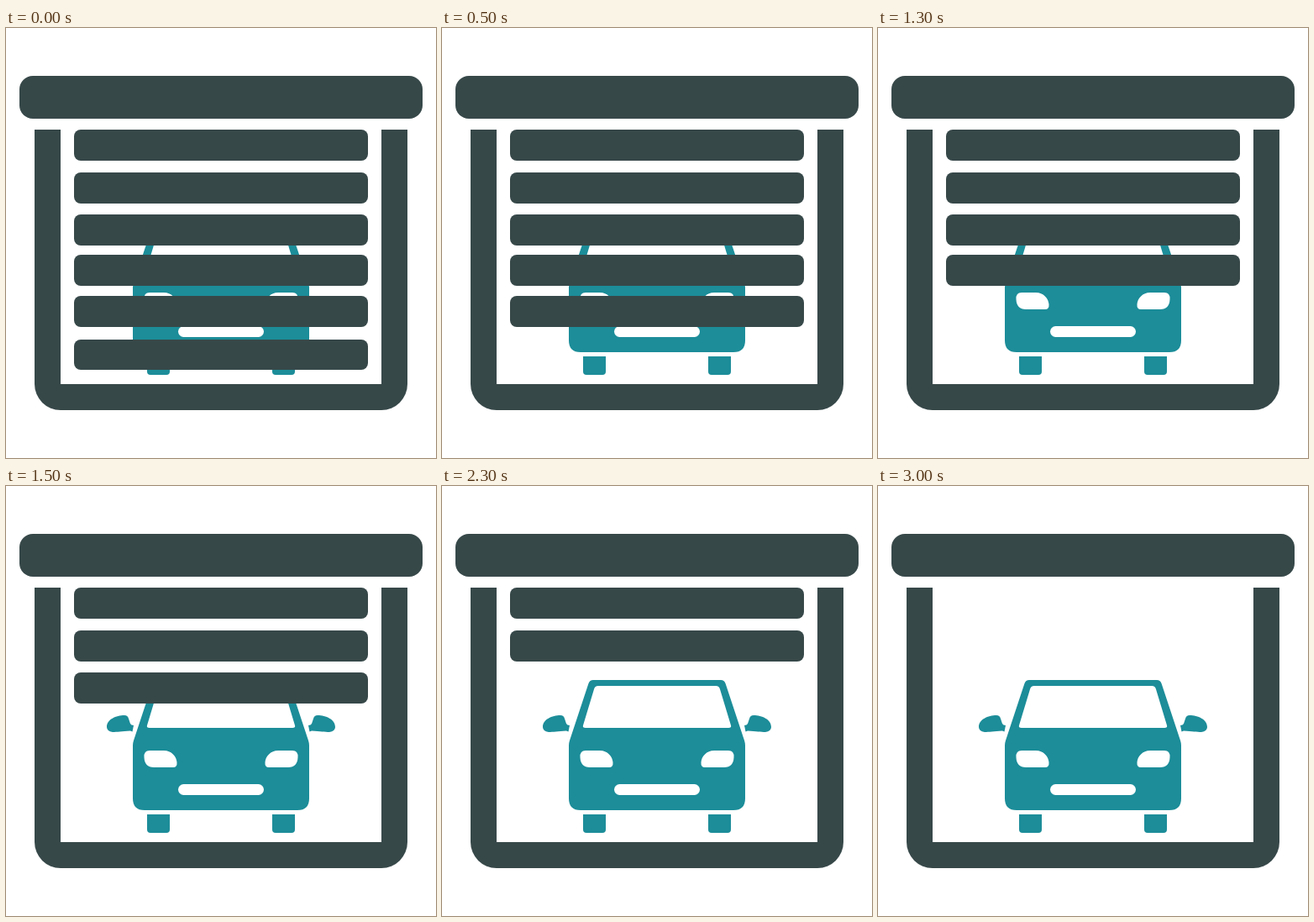
Animation of 512x512 px, one loop 3500 ms. Source, as an HTML page with a canvas:

```html
<!DOCTYPE html>
<html lang="en">
<head>
<meta charset="utf-8">
<title>Garage door</title>
<style>
html, body { margin: 0; width: 100%; height: 100%; overflow: hidden; background: #fff; }
canvas { display: block; width: 100vw; height: 100vh; }
</style>
</head>
<body>
<canvas id="stage" width="512" height="512"></canvas>
<script>
const ctx = document.getElementById('stage').getContext('2d');
const DARK = '#374849', TEAL = '#1c8d99', WHITE = '#fff';
const STEP = 500;
const slats = [[121, 37], [172, 37], [222, 37], [270, 37], [319, 37], [371, 36]];

const body = new Path2D(`M180 231H332Q336 231 337.5 235L360 303Q361 306 361 309
  V372Q361 386 347 386H165Q151 386 151 372V309Q151 306 152 303L174.500 235Q176 231 180 231Z`);
const windshield = new Path2D(`M186 238H326Q330 238 331 242L344 285Q345 288 341 288
  H171Q167 288 168 285L181 242Q182 238 186 238Z`);
const headlight = new Path2D(`M171 315H188C197 315 203 322 203.500 329
  Q204 335 199 335H176Q165 335 164.500 323Q164 315 171 315Z`);
const sideMirror = new Path2D(`M120 287C120 278 131 273 141 273Q145 273 146 277
  L148 283Q149 285 152 285L150.500 292.500L148 291.500C138 292 132 293 127 293Q120 292 120 287Z`);

function fillBox(x, y, w, h, radius, color) {
  ctx.fillStyle = color;
  ctx.beginPath();
  ctx.roundRect(x, y, w, h, radius);
  ctx.fill();
}

function fillPath(path, color) {
  ctx.fillStyle = color;
  ctx.fill(path);
}

function bothSides(draw) {
  draw();
  ctx.save();
  ctx.translate(512, 0);
  ctx.scale(-1, 1);
  draw();
  ctx.restore();
}

function drawCar() {
  fillPath(body, TEAL);
  fillPath(windshield, WHITE);
  bothSides(() => {
    fillPath(headlight, WHITE);
    fillPath(sideMirror, TEAL);
    fillBox(168, 391, 27, 22, [0, 0, 4, 4], TEAL);
  });
  fillBox(205, 355, 102, 13, 6.5, WHITE);
}

function drawGarage() {
  fillBox(16, 57, 480, 51, 16, DARK);
  fillBox(34, 121, 31, 303, 0, DARK);
  fillBox(447, 121, 31, 303, 0, DARK);
  fillBox(34, 424, 444, 31, [0, 0, 31, 31], DARK);
}

function render(now) {
  const raised = Math.floor(now / STEP) % (slats.length + 1);
  ctx.fillStyle = WHITE;
  ctx.fillRect(0, 0, 512, 512);
  drawCar();
  drawGarage();
  for (const [y, height] of slats.slice(0, slats.length - raised)) {
    fillBox(81, y, 350, height, 8, DARK);
  }
}

let start;
function tick(now) {
  start ??= now;
  render(now - start);
  requestAnimationFrame(tick);
}
render(0);
requestAnimationFrame(tick);
</script>
</body>
</html>
```
